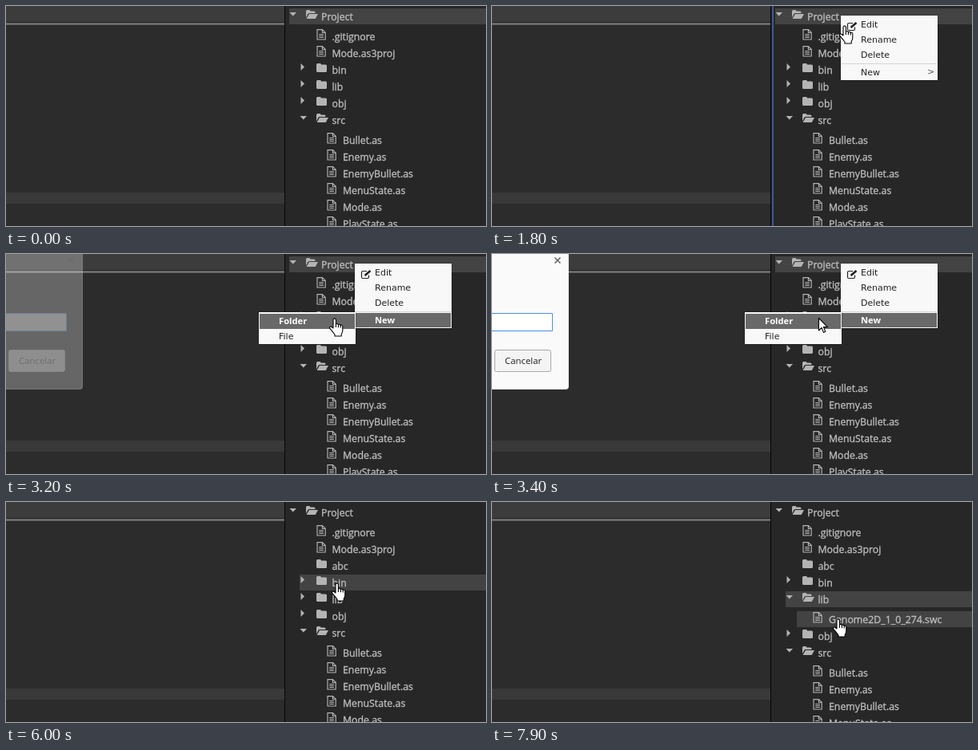
Recreate the animation shown at these times as an HTML page with a canvas. Size 600x276 px, loop 8 s.

```html
<!DOCTYPE html>
<html lang="en">
<head>
<meta charset="utf-8">
<title>Project tree</title>
<style>
html, body { margin: 0; width: 100%; height: 100%; overflow: hidden; background: #2c2c2c; }
canvas { display: block; }
</style>
</head>
<body>
<canvas id="stage" width="600" height="276"></canvas>
<script>
const g = document.getElementById('stage').getContext('2d');
const LOOP = 8000, STEP = 100;
const TREE = "12.3px 'Open Sans', 'Noto Sans', sans-serif";
const MENU = "11px 'DejaVu Sans', sans-serif";
const MENU_BOLD = "bold 11.2px 'Open Sans', sans-serif";

// time, left, top of the pointer
const PATH = [
  [300, 582, 17], [500, 500, 8], [800, 431, 12], [1700, 431, 12], [1800, 434, 24],
  [2000, 446, 50], [2200, 452, 80], [2300, 455, 91], [2600, 455, 80], [2700, 434, 77],
  [3000, 404, 80], [3300, 404, 80], [3400, 403, 80], [5200, 403, 80], [5500, 412, 86],
  [5700, 412, 86], [6000, 407, 101], [6200, 407, 101], [6500, 416, 129], [6800, 422, 124],
  [7400, 422, 124], [7700, 426, 148], [7800, 426, 148], [7900, 426, 146]
];

const HAND = new Path2D('M5 13V2.2q1.7-2.6 3.4 0V8q1.6-1.2 3 .6q1.6-1 2.8 .8q2-.6 2.6 1V16q0 2-1.6 4.5V23H7V21Q4 17 .4 12.8q.3-2.4 2.4-1.6z');
const FINGERS = new Path2D('M8.4 8v4M11.4 8.8v3.4M14.2 9.6v3');
const ARROW = new Path2D('M.5 .5V16L4 12.5 6.4 18.4 8.8 17.3 6.4 11.6H11.4Z');
const FILE = new Path2D('M.6 .6H7L10.8 4.3V13H.6ZM7 .6V4.5H10.8M2.8 6.5H8.5M2.8 8.5H8.5M2.8 10.5H8.5');
const FOLDER = new Path2D('M0 1.5Q0 0 1.5 0H4.5Q6 0 6 1.5H11.5Q13 1.5 13 3V9.5Q13 11 11.5 11H1.5Q0 11 0 9.5Z');
const OPEN = new Path2D('M0 9.5V1.5Q0 0 1.5 0H4Q5.5 0 5.5 1.5H10Q11.5 1.5 11.5 3V4H4Q3 4 2.3 5ZM4 5H15L12 10.5Q11.6 11 11 11H.6Z');
const PENCIL = new Path2D('M9.5 7.5V10Q9.5 11.5 8 11.5H2Q.5 11.5 .5 10V4Q.5 2.5 2 2.5H7');

function rect(color, x, y, w, h) {
  g.fillStyle = color;
  g.fillRect(x, y, w, h);
}

function text(str, x, y, font, color, weight = 0) {
  g.font = font;
  g.fillStyle = g.strokeStyle = color;
  g.fillText(str, x, y);
  if (weight) {
    g.lineWidth = weight;
    g.strokeText(str, x, y);
  }
}

function at(x, y, draw) {
  g.save();
  g.translate(x, y);
  draw();
  g.restore();
}

function clipped(x, y, w, h, draw) {
  g.save();
  g.beginPath();
  g.rect(x, y, w, h);
  g.clip();
  draw();
  g.restore();
}

// share done of a change drawn in three steps
const ramp = (t, start) => [0, .28, .75, 1][Math.max(0, Math.min(3, (t - start) / STEP + 1))];

function pointer(t) {
  if (t < PATH[0][0]) return null;
  const i = PATH.findIndex(p => p[0] >= t);
  if (i < 0) return PATH[PATH.length - 1].slice(1);
  if (i === 0) return PATH[0].slice(1);
  const a = PATH[i - 1], b = PATH[i], k = (t - a[0]) / (b[0] - a[0]);
  return [1, 2].map(n => Math.round(a[n] + (b[n] - a[n]) * k));
}

function editor() {
  rect('#2c2c2c', 0, 0, 348, 276);
  rect('#3c3c3c', 0, 0, 348, 20);
  rect('#262626', 0, 20, 348, 1);
  rect('#5a5a5a', 0, 21, 348, 3);
  rect('#7c7c7c', 0, 22, 348, 1);
  rect('#393939', 0, 234, 348, 14);
  rect('#050505', 348, 0, 1, 276);
}

function caret(x, y, down) {
  g.fillStyle = '#b4b4b4';
  g.beginPath();
  if (down) { g.moveTo(x + .5, y - 5); g.lineTo(x + 9, y - 5); g.lineTo(x + 4.75, y - .5); }
  else { g.moveTo(x + 1.5, y - 8); g.lineTo(x + 6, y - 3.5); g.lineTo(x + 1.5, y + 1); }
  g.fill();
}

// kind: f file, d plain folder, c closed folder, o open folder
function row(depth, name, kind, y, lit) {
  const left = 354 + 13.5 * depth, x = Math.floor(left);
  if (lit) rect('#434343', x, y - 10, 600 - x, 20);
  if (kind === 'c' || kind === 'o') caret(x, y, kind === 'o');
  const isFile = kind === 'f';
  const icon = isFile ? FILE : kind === 'o' ? OPEN : FOLDER;
  at(375 + 13 * depth + (isFile ? .4 : 0), y - (isFile ? 9 : 8), () => {
    g.fillStyle = g.strokeStyle = '#b4b4b4';
    g.lineWidth = 1.15;
    if (isFile) g.stroke(icon); else g.fill(icon);
  });
  text(name, left + 40, y + 5, TREE, '#bcbcbc', .35);
}

function tree(t, hand) {
  rect('#272727', 349, 0, 251, 276);
  if (t >= 1200 && t < 3200) rect('#3d5796', 350, 0, 2, 276);
  const grow = ramp(t, 7100);
  const hover = y => t >= 4700 && Math.abs(hand[1] + 1 - y) <= 10;
  const rows = [[0, 'Project', 'o'], [1, '.gitignore', 'f'], [1, 'Mode.as3proj', 'f']];
  if (t >= 4800) rows.push([1, 'abc', 'd']);
  rows.push([1, 'bin', 'c'], [1, 'lib', grow ? 'o' : 'c'], [1, 'obj', 'c'], [1, 'src', 'o']);
  for (const n of ['Bullet', 'Enemy', 'EnemyBullet', 'MenuState', 'Mode', 'PlayState'])
    rows.push([2, n + '.as', 'f']);

  let y = -8, last = 0;
  for (const [depth, name, kind] of rows) {
    y += depth > last || name === 'Project' ? 25 : 21;
    if (name === 'Project') y = 13;
    last = depth;
    const chosen = name === 'Project' ? t < 4800 : name === 'lib' && grow > 0;
    row(depth, name, kind, y, chosen || hover(y));
    if (name === 'lib' && grow) {
      const h = Math.round(25 * grow), top = y;
      clipped(349, top + 11, 251, h, () =>
        row(2, 'Genome2D_1_0_274.swc', 'f', top + 25, hover(top + 25)));
      y += h;
    }
  }
}

function panel(x, y, w, h) {
  g.save();
  g.shadowColor = 'rgba(0,0,0,.4)';
  g.shadowBlur = 2;
  rect('#f8f8f8', x, y, w, h);
  g.restore();
}

function item(label, x, y, lit) {
  if (lit) rect('#696969', x - 24, y - 9, 119, 19);
  text(label, x, y + 4, lit ? MENU_BOLD : MENU, lit ? '#fff' : '#222');
}

function editIcon() {
  at(444, 19, () => {
    g.strokeStyle = '#222';
    g.lineWidth = 1.2;
    g.stroke(PENCIL);
    g.lineWidth = 2.6;
    g.beginPath();
    g.moveTo(4.5, 8);
    g.lineTo(11.5, 2);
    g.stroke();
  });
}

function menus(t, hand) {
  if (t < 1200 || t >= 4800) return;
  const h = t >= 4700 ? 8 : Math.round(81 * ramp(t, 1200));
  const inMain = t > 1800 && t < 2300;
  panel(436, 12, 121, h);
  clipped(436, 12, 121, h - 1, () => {
    rect('#d4d4d4', 437, 72, 119, 1);
    const open = t >= 2200;
    [['Edit', 23], ['Rename', 42], ['Delete', 61], ['New', 83]].forEach(([label, y]) =>
      item(label, 461, y, label === 'New' ? open : inMain && Math.abs(hand[1] - y) <= 9));
    editIcon();
    if (!open) text('>', 544, 86, MENU, '#555');
  });

  const sub = t < 4700 ? ramp(t, 2300) : 0;
  if (!sub) return;
  const subHeight = Math.round(40 * sub);
  panel(316, 73, 121, subHeight);
  clipped(316, 73, 121, subHeight - 1, () => {
    item('Folder', 341, 84, t >= 2800);
    item('File', 341, 103, false);
  });
}

function box(x, y, w, h, r, fill, stroke) {
  g.beginPath();
  g.roundRect(x, y, w, h, r);
  g.fillStyle = fill;
  g.fill();
  g.strokeStyle = stroke;
  g.lineWidth = 1;
  g.stroke();
}

function dialog(t) {
  if (t < 3200 || t >= 4700) return;
  g.save();
  g.globalAlpha = ramp(t, 3200);
  box(-20.5, -20.5, 116, 190, 3, '#fafafa', '#e4e4e4');
  g.strokeStyle = '#666';
  g.lineWidth = 1.6;
  g.beginPath();
  g.moveTo(78.5, 4.5); g.lineTo(85.5, 11.5);
  g.moveTo(85.5, 4.5); g.lineTo(78.5, 11.5);
  g.stroke();
  box(-20.5, 74.5, 96, 22, 0, '#fff', '#4a90e2');
  box(3.5, 120.5, 70, 27, 2, '#f4f4f4', '#a8a8a8');
  text('Cancelar', 16, 138, "11.4px 'Open Sans', sans-serif", '#222');
  g.restore();
}

function cursor(t, hand) {
  if (!hand) return;
  const arrow = t >= 3300 && t < 4700;
  at(hand[0] + (arrow ? 5 : 0), hand[1], () => {
    g.fillStyle = '#fff';
    g.strokeStyle = '#000';
    g.lineWidth = 1.1;
    g.lineJoin = 'round';
    g.fill(arrow ? ARROW : HAND);
    g.stroke(arrow ? ARROW : HAND);
    if (!arrow) g.stroke(FINGERS);
  });
}

function frame() {
  const t = Math.floor(performance.now() % LOOP / STEP) * STEP;
  const hand = pointer(t);
  editor();
  tree(t, hand);
  menus(t, hand);
  dialog(t);
  cursor(t, hand);
  requestAnimationFrame(frame);
}
frame();
</script>
</body>
</html>
```
